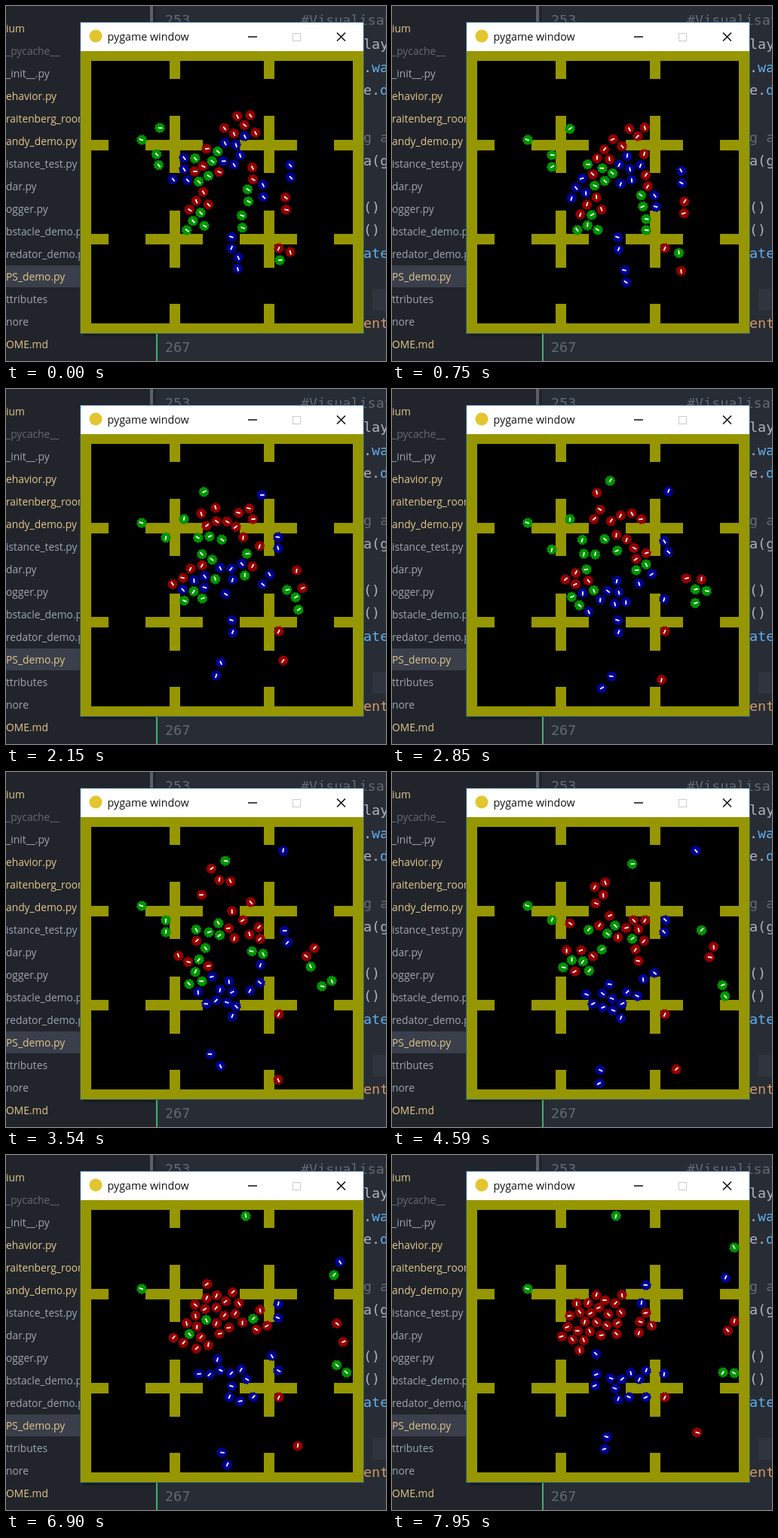
Animation, 504 px wide and 472 px high, one loop 8000 ms. Source, as an HTML page:

```html
<!DOCTYPE html>
<html lang="en">
<head>
<meta charset="utf-8">
<title>pygame window</title>
<style>
  html, body { margin: 0; width: 100%; height: 100%; overflow: hidden; background: #282c34; }
  svg { display: block; }
  text { white-space: pre; }
  .tree { font: 13.8px "Open Sans", "Noto Sans", sans-serif; }
  .code { font: 18.4px "DejaVu Sans Mono", monospace; }
  .title { font: 14.3px "Open Sans", "Noto Sans", sans-serif; }
</style>
</head>
<body>
<svg id="stage" width="504" height="472" viewBox="0 0 504 472">
  <rect width="504" height="472" fill="#282c34"/>
  <rect width="199" height="472" fill="#21252b"/>
  <rect y="345" width="199" height="29" fill="#3a3f4b"/>
  <rect x="191" width="4" height="22" fill="#5a606b"/>
  <rect x="199" y="400" width="2" height="72" fill="#43ad6d"/>
  <rect x="103" y="435" width="95" height="4" fill="#171b20"/>
  <rect x="486" y="376" width="18" height="29" fill="#2f343e"/>
  <g id="editor"></g>
  <rect x="98" y="21" width="377" height="415" fill="#2b5878"/>
  <rect x="99" y="22" width="375" height="38" fill="#fff"/>
  <circle cx="119" cy="40" r="8.5" fill="#e3c52f"/>
  <text class="title" x="134.5" y="46" fill="#111">pygame window</text>
  <path d="M321 41H333M439 35.5L450 46.5M450 35.5L439 46.5" stroke="#111" stroke-width="1.6"/>
  <rect x="380.5" y="36.5" width="10" height="10" fill="none" stroke="#ccc"/>
  <rect x="99" y="60" width="375" height="375" fill="#969600"/>
  <rect x="113" y="73" width="347" height="349"/>
  <g id="walls" fill="#969600"></g>
  <g id="balls"></g>
</svg>
<script>
const LOOP = 8000, END = 7950, STEP = 70;
const FILL = { r: '#960000', g: '#009600', b: '#000096' };

// Flocks: colour at the start and end, size, and the points the centre passes.
const flocks = [
  ['rr', 6, [310, 161], [314, 205], [284, 212]],
  ['rr', 4, [266, 213], [280, 145], [262, 216]],
  ['rr', 2, [330, 225], [340, 225]],
  ['rr', 4, [257, 263], [238, 238]],
  ['rr', 2, [374, 265], [454, 230]],
  ['rr', 1, [362, 322]],
  ['rr', 1, [377, 327], [363, 408], [408, 377]],
  ['gg', 1, [180, 178]],
  ['gg', 1, [204, 162], [311, 120], [307, 81]],
  ['gr', 2, [204, 198], [262, 205]],
  ['gr', 5, [266, 212], [287, 210]],
  ['gr', 4, [252, 291], [250, 238]],
  ['gr', 2, [324, 254], [340, 222]],
  ['gg', 2, [316, 289], [447, 287], [450, 291]],
  ['gg', 1, [363, 338], [452, 131]],
  ['bb', 5, [303, 190], [304, 302], [318, 300]],
  ['bb', 4, [233, 222], [274, 303], [274, 289]],
  ['bb', 2, [380, 222], [349, 199]],
  ['bb', 2, [344, 248], [349, 297]],
  ['bb', 2, [303, 318]],
  ['bb', 2, [310, 343], [275, 400], [290, 395]],
  ['bb', 1, [285, 205], [386, 95], [451, 160]]
];

function add(parent, tag, attrs, text) {
  const el = document.createElementNS('http://www.w3.org/2000/svg', tag);
  for (const key in attrs) el.setAttribute(key, attrs[key]);
  if (text) el.textContent = text;
  return parent.appendChild(el);
}
const byId = id => document.getElementById(id);

function drawEditor() {
  const YELLOW = '#e3c68a', GREY = '#9da5b4', DIM = '#626975', CYAN = '#61afef', PALE = '#abb2bf';
  const files = [
    ['ium', YELLOW], ['_pycache__', DIM], ['_init__.py', GREY], ['ehavior.py', YELLOW],
    ['raitenberg_room.py', YELLOW], ['andy_demo.py', YELLOW], ['istance_test.py', GREY],
    ['dar.py', GREY], ['ogger.py', GREY], ['bstacle_demo.py', GREY], ['redator_demo.py', GREY],
    ['PS_demo.py', YELLOW], ['ttributes', GREY], ['nore', GREY], ['OME.md', YELLOW]
  ];
  files.forEach(([name, fill], i) =>
    add(byId('editor'), 'text', { class: 'tree', x: 0, y: 35 + 30 * i, fill }, name));

  const code = [
    [211, 25, '253', DIM], [391, 25, '#Visualisation', DIM, 'italic'],
    [474, 57, 'lay', PALE], [474, 88, '.', PALE], [485, 88, 'wa', CYAN],
    [474, 118, 'e.', PALE], [496, 118, 'd', CYAN], [474, 181, 'g a', DIM, 'italic'],
    [474, 212, 'a(g', PALE], [474, 274, '()', PALE], [474, 304, '()', PALE],
    [474, 335, 'ate', CYAN], [474, 428, 'ent', '#d19a66'], [211, 460, '267', DIM]
  ];
  for (const [x, y, text, fill, style = 'normal'] of code)
    add(byId('editor'), 'text', { class: 'code', x, y, fill, 'font-style': style,
      'font-weight': fill === CYAN ? 'bold' : 'normal' }, text);
}

function buildWalls() {
  const walls = [];
  for (const x of [217, 342])
    for (const [y, h] of [[60, 37], [146, 76], [272, 76], [396, 39]]) walls.push([x, y, 14, h]);
  for (const y of [178, 303])
    for (const [x, w] of [[99, 37], [185, 76], [310, 76], [435, 39]]) walls.push([x, y, w, 14]);
  for (const [x, y, width, height] of walls) add(byId('walls'), 'rect', { x, y, width, height });
  return walls;
}

function random(seed) {
  const v = Math.sin(seed * 12.9898) * 43758.5453;
  return v - Math.floor(v);
}

function makeBalls() {
  const balls = [];
  for (const [colours, size, ...path] of flocks) {
    for (let k = 0; k < size; k++) {
      const node = add(byId('balls'), 'g', {});
      add(node, 'circle', { r: 6, 'stroke-width': 1.6, 'stroke-dasharray': '2.6 1.4' });
      add(node, 'path', { d: 'M-2 0H3.5', stroke: '#fff', 'stroke-width': 1.8 });
      balls.push({ node, colours, path, seed: balls.length + 1,
        radius: size > 1 ? 9 * Math.sqrt(k + 0.5) : 0, spoke: k * 2.4 + size });
    }
  }
  return balls;
}

// Flock centre, plus a sunflower offset and a wander that starts at zero.
function roam({ path, seed, radius, spoke }, t) {
  const legs = path.length - 1;
  const s = t / END * legs, i = Math.max(0, Math.min(legs - 1, Math.floor(s)));
  const a = path[i], b = path[i + 1] || a, u = s - i;
  const reach = legs ? 10 : 0;
  const wave = n => reach * Math.sin(t / 1000 * (1 + 2 * random(seed + n)));
  return {
    x: a[0] + (b[0] - a[0]) * u + radius * Math.cos(spoke) + wave(100),
    y: a[1] + (b[1] - a[1]) * u + radius * Math.sin(spoke) + wave(200)
  };
}

function heading(ball, t) {
  if (ball.path.length === 1) return random(ball.seed) * 360;
  const p = roam(ball, t), q = roam(ball, t + STEP);
  return Math.atan2(q.y - p.y, q.x - p.x) * 180 / Math.PI;
}

function separate(points) {
  const room = 15;
  points.forEach((p, i) => {
    for (const q of points.slice(i + 1)) {
      const dx = q.x - p.x, dy = q.y - p.y, d = Math.hypot(dx, dy) || 1;
      if (d >= room) continue;
      const push = (room - d) / d / 2;
      p.x -= dx * push; p.y -= dy * push;
      q.x += dx * push; q.y += dy * push;
    }
  });
}

// Slides a point out of any wall and keeps it inside the room.
function avoidWalls(p) {
  const pad = 5;
  for (const [x, y, w, h] of walls) {
    const left = p.x - x + pad, right = x + w + pad - p.x;
    const up = p.y - y + pad, down = y + h + pad - p.y;
    const least = Math.min(left, right, up, down);
    if (least <= 0) continue;
    if (least === left) p.x -= left;
    else if (least === right) p.x += right;
    else if (least === up) p.y -= up;
    else p.y += down;
  }
  p.x = Math.max(119, Math.min(454, p.x));
  p.y = Math.max(80, Math.min(416, p.y));
}

// The picture advances in steps, with one longer hold before 3470 ms.
function snap(t) {
  if (t < 130) return 0;
  const base = t < 3470 ? 960 : 3470;
  const s = base + Math.floor((t - base) / STEP) * STEP;
  return s === 3410 ? 3340 : Math.max(130, s);
}

let shown = -1;
function render(ms) {
  const t = snap(ms % LOOP);
  if (t === shown) return;
  shown = t;
  const points = balls.map(ball => roam(ball, t));
  for (let pass = 0; pass < 6; pass++) {
    separate(points);
    points.forEach(avoidWalls);
  }
  balls.forEach((ball, i) => {
    const { x, y } = points[i];
    const caught = t > 2800 + 4800 * random(ball.seed + 300);
    const fill = FILL[ball.colours[caught ? 1 : 0]];
    ball.node.setAttribute('transform',
      `translate(${x.toFixed(1)} ${y.toFixed(1)}) rotate(${heading(ball, t).toFixed(0)})`);
    ball.node.setAttribute('fill', fill);
    ball.node.firstChild.setAttribute('stroke', fill);
  });
}

drawEditor();
const walls = buildWalls();
const balls = makeBalls();
const start = performance.now();
function tick() {
  render(performance.now() - start);
  requestAnimationFrame(tick);
}
tick();
</script>
</body>
</html>
```
